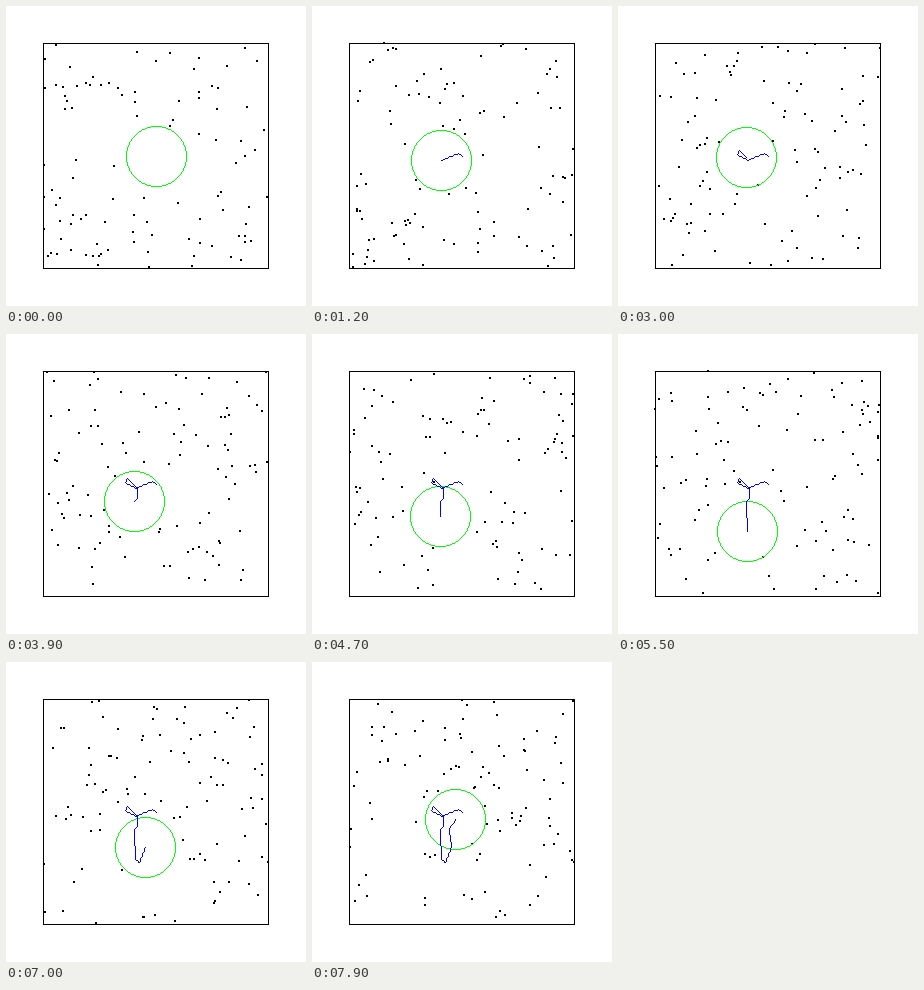
Animation, 300 px wide and 300 px high, one loop 8000 ms. Source, as a matplotlib script:

```python
import numpy as np
import matplotlib.pyplot as plt
from matplotlib.animation import FuncAnimation
from matplotlib.collections import PolyCollection
from matplotlib.patches import Rectangle

SIZE, DPI = 300, 100
FRAMES, STEP_MS = 80, 100
LOW, HIGH = 37, 262
COUNT, RADIUS, SPEED, SUBSTEPS = 100, 30, 4.0, 4

# Main turns of the big particle: time in frames, x, y
TURNS = np.array([
    (0, 150, 150), (2, 146, 147), (12, 129, 154), (20, 119, 148),
    (23, 121, 144), (33, 131, 154), (36, 131, 164), (39, 128, 167),
    (55, 129, 197), (61, 133, 200), (70, 139, 185), (75, 137, 167),
    (79, 143, 157),
])


def big_position(t):
    return np.array([np.interp(t, TURNS[:, 0], TURNS[:, k]) for k in (1, 2)])


def simulate():
    """Positions of the small particles in every frame."""
    rng = np.random.default_rng(12)
    pos = rng.uniform(LOW, HIGH, (4 * COUNT, 2))
    away = np.hypot(*(pos - big_position(0)).T) > RADIUS
    pos = pos[away][:COUNT]
    angle = rng.uniform(0, 2 * np.pi, COUNT)
    vel = SPEED * np.column_stack([np.cos(angle), np.sin(angle)])
    history = [pos]
    dt = 1 / SUBSTEPS
    for step in range(1, (FRAMES - 1) * SUBSTEPS + 1):
        t = step * dt
        center = big_position(t)
        drift = (center - big_position(t - dt)) / dt
        pos = pos + vel * dt

        vel = np.where(pos < LOW, np.abs(vel), vel)
        vel = np.where(pos > HIGH, -np.abs(vel), vel)
        pos = np.clip(pos, LOW, HIGH)

        offset = pos - center
        dist = np.hypot(*offset.T)[:, None]
        normal = offset / dist
        inside = dist < RADIUS
        toward = np.sum((vel - drift) * normal, axis=1, keepdims=True)
        vel = np.where(inside & (toward < 0), vel - 2 * toward * normal, vel)
        pos = np.where(inside, center + RADIUS * normal, pos)
        if step % SUBSTEPS == 0:
            history.append(pos)
    return history


def circle_pixels(radius):
    """One-pixel-wide ring around the origin."""
    reach = int(round(radius / np.sqrt(2)))
    a = np.arange(-reach, reach + 1)
    b = np.round(np.sqrt(radius ** 2 - a ** 2))
    arc = np.column_stack([a, b])
    return np.vstack([arc, -arc, arc[:, ::-1], -arc[:, ::-1]])


def line_pixels(points):
    """One-pixel-wide line through whole-numbered points."""
    parts = [points[:1]]
    for p, q in zip(points, points[1:]):
        steps = int(np.abs(q - p).max())
        parts.append(np.round(np.linspace(p, q, steps + 1)))
    return np.vstack(parts)


def squares(corners, side):
    unit = np.array([(0, 0), (1, 0), (1, 1), (0, 1)])
    return corners[:, None, :] + side * unit


def pixel_layer(color, zorder):
    layer = PolyCollection([], facecolors=[color], linewidths=0,
                           antialiaseds=False, zorder=zorder)
    ax.add_collection(layer, autolim=False)
    return layer


dots_at = simulate()
track = np.array([np.round(big_position(t)) for t in range(FRAMES)])
ring = circle_pixels(RADIUS)

fig = plt.figure(figsize=(SIZE / DPI, SIZE / DPI), dpi=DPI, facecolor="white")
ax = fig.add_axes([0, 0, 1, 1])
ax.set_xlim(0, SIZE)
ax.set_ylim(SIZE, 0)
ax.axis("off")

ax.add_patch(Rectangle((LOW, LOW), HIGH - LOW, HIGH - LOW, fill=False,
                       edgecolor="black", linewidth=72 / DPI,
                       antialiased=False, snap=True))
dots = pixel_layer((0, 0, 0), 2)
big = pixel_layer((0, 1, 0), 3)
trail = pixel_layer((0, 0, 1), 4)


def draw(i):
    dots.set_verts(squares(np.round(dots_at[i]) - 1, 2))
    big.set_verts(squares(track[i] + ring, 1))
    trail.set_verts(squares(line_pixels(track[:i + 1]), 1) if i else [])
    return dots, big, trail


anim = FuncAnimation(fig, draw, frames=FRAMES, interval=STEP_MS,
                     repeat=True, repeat_delay=0)
plt.show()
```
